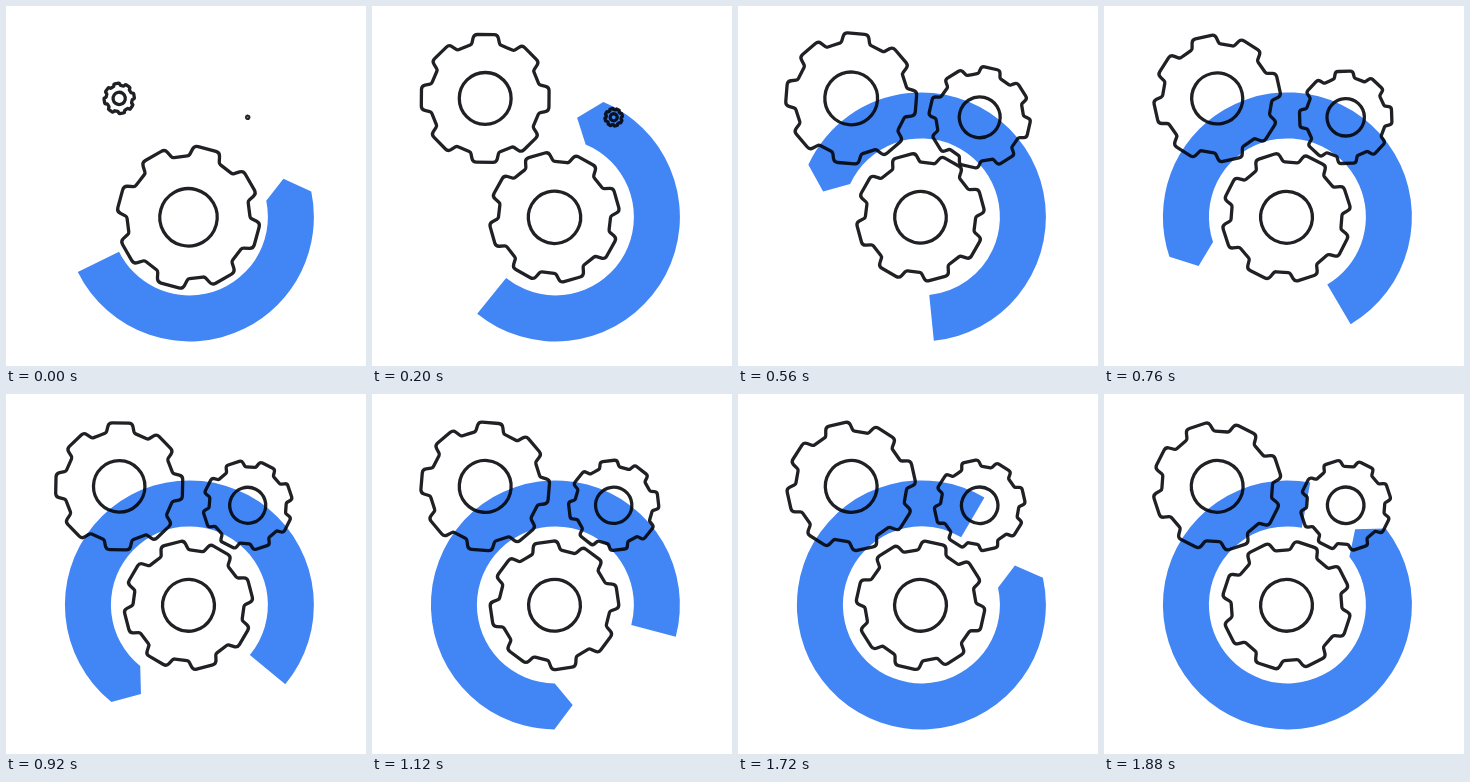
These frames come from a looping animation (360 px wide and 360 px high, 1.92 s). An HTML page with a canvas:

```html
<!DOCTYPE html>
<html lang="en">
<head>
<meta charset="utf-8">
<title>Turning gears</title>
<style>
  html, body { margin: 0; width: 100%; height: 100%; overflow: hidden; background: #fff; }
  canvas { display: block; width: 360px; height: 360px; }
</style>
</head>
<body>
<canvas id="stage"></canvas>
<script>
const LOOP = 1920, STEP = 40, SIZE = 360;
const BLUE = '#4285f4', INK = '#202124';
const RAD = Math.PI / 180;
const CX = 183.4, CY = 210.9, OUTER = 124.5, INNER = 78.5;

const canvas = document.getElementById('stage');
const ctx = canvas.getContext('2d');
const dpr = window.devicePixelRatio || 1;
canvas.width = canvas.height = SIZE * dpr;

// All gears share one entrance; "start" is when it begins, "dir" the way it turns.
const gears = [
  { x: 113.2, y: 92.4, size: .988, dir: -1, start: -90 },
  { x: 241.7, y: 111.3, size: .697, dir: -1, start: 120 },
  { x: 182.5, y: 211.3, size: .988, dir: 1, start: -470 }
];

// Extra turn during the entrance: age in ms, degrees.
const swing = [[0, -45], [240, -12], [460, 17], [640, 23], [840, 34], [1000, 15], [1230, 3], [1500, 0]];

// Smooth curve through a few keys, held at both ends.
function sample(keys, t) {
  const end = keys.length - 1;
  if (t <= keys[0][0]) return keys[0][1];
  if (t >= keys[end][0]) return keys[end][1];
  const i = keys.findIndex(key => key[0] > t) - 1;
  const slope = k => {
    const a = keys[Math.max(k - 1, 0)], b = keys[Math.min(k + 1, end)];
    return (b[1] - a[1]) / (b[0] - a[0]);
  };
  const [t0, v0] = keys[i], [t1, v1] = keys[i + 1];
  const d = t1 - t0, u = (t - t0) / d, w = 1 - u;
  return v0 * w * w * (1 + 2 * u) + v1 * u * u * (3 - 2 * u)
    + d * u * w * (slope(i) * w - slope(i + 1) * u);
}

// Damped spring from 0 to 1: first peak after 420 ms, 12% over.
function spring(age) {
  if (age <= 0) return 0;
  const w = Math.PI / 420, damp = -Math.log(.12) / 420;
  return 1 - Math.exp(-damp * age) * (Math.cos(w * age) + damp / w * Math.sin(w * age));
}

const polar = (r, deg) => [CX + r * Math.cos(deg * RAD), CY + r * Math.sin(deg * RAD)];

// The tail turns evenly while the pointed head runs ahead and slows down.
function drawRing(t) {
  const tail = 153.7 - .124 * t;
  const head = tail - 165.5 - 188 * (1 - Math.exp(-t / 1120));
  ctx.beginPath();
  ctx.arc(CX, CY, OUTER, tail * RAD, head * RAD, true);
  ctx.lineTo(...polar((OUTER + INNER) / 2, head - 10.3));
  ctx.lineTo(...polar(INNER, head));
  ctx.arc(CX, CY, INNER, head * RAD, tail * RAD, false);
  ctx.closePath();
  ctx.fillStyle = BLUE;
  ctx.fill();
}

// Corners of one tooth: x, y, rounding.
const tooth = [[-14.2, -54.4, 3], [-12, -64.5, 4.5], [12, -64.5, 4.5], [14.2, -54.4, 3]];
const outline = [];
for (let i = 0; i < 8; i++) {
  const c = Math.cos(i * 45 * RAD), s = Math.sin(i * 45 * RAD);
  for (const [x, y, r] of tooth) outline.push([x * c - y * s, x * s + y * c, r]);
}

function drawGear({ x, y, size, dir, start }, t) {
  const age = t - start;
  const turn = dir * (.035 * (t - 1360) + sample(swing, age));
  const scale = size * Math.max(.025, spring(age));
  ctx.save();
  ctx.translate(x, y);
  ctx.save();
  ctx.rotate(turn * RAD);
  ctx.scale(scale, scale);
  ctx.beginPath();
  const last = outline[outline.length - 1], first = outline[0];
  ctx.moveTo((last[0] + first[0]) / 2, (last[1] + first[1]) / 2);
  outline.forEach(([px, py, r], i) => {
    const next = outline[(i + 1) % outline.length];
    ctx.arcTo(px, py, next[0], next[1], r);
  });
  ctx.closePath();
  ctx.moveTo(26.2, 0);
  ctx.arc(0, 0, 26.2, 0, 2 * Math.PI);
  ctx.restore();
  // The line keeps its weight at every scale.
  ctx.lineWidth = 3.3;
  ctx.lineJoin = 'round';
  ctx.strokeStyle = INK;
  ctx.stroke();
  ctx.restore();
}

function draw(t) {
  ctx.setTransform(dpr, 0, 0, dpr, 0, 0);
  ctx.globalCompositeOperation = 'source-over';
  ctx.fillStyle = '#fff';
  ctx.fillRect(0, 0, SIZE, SIZE);
  drawRing(t);
  ctx.globalCompositeOperation = 'multiply';
  for (const gear of gears) drawGear(gear, t);
}

const begin = performance.now();
function tick() {
  const t = (performance.now() - begin) % LOOP;
  draw(Math.floor(t / STEP) * STEP);
  requestAnimationFrame(tick);
}
tick();
</script>
</body>
</html>
```
